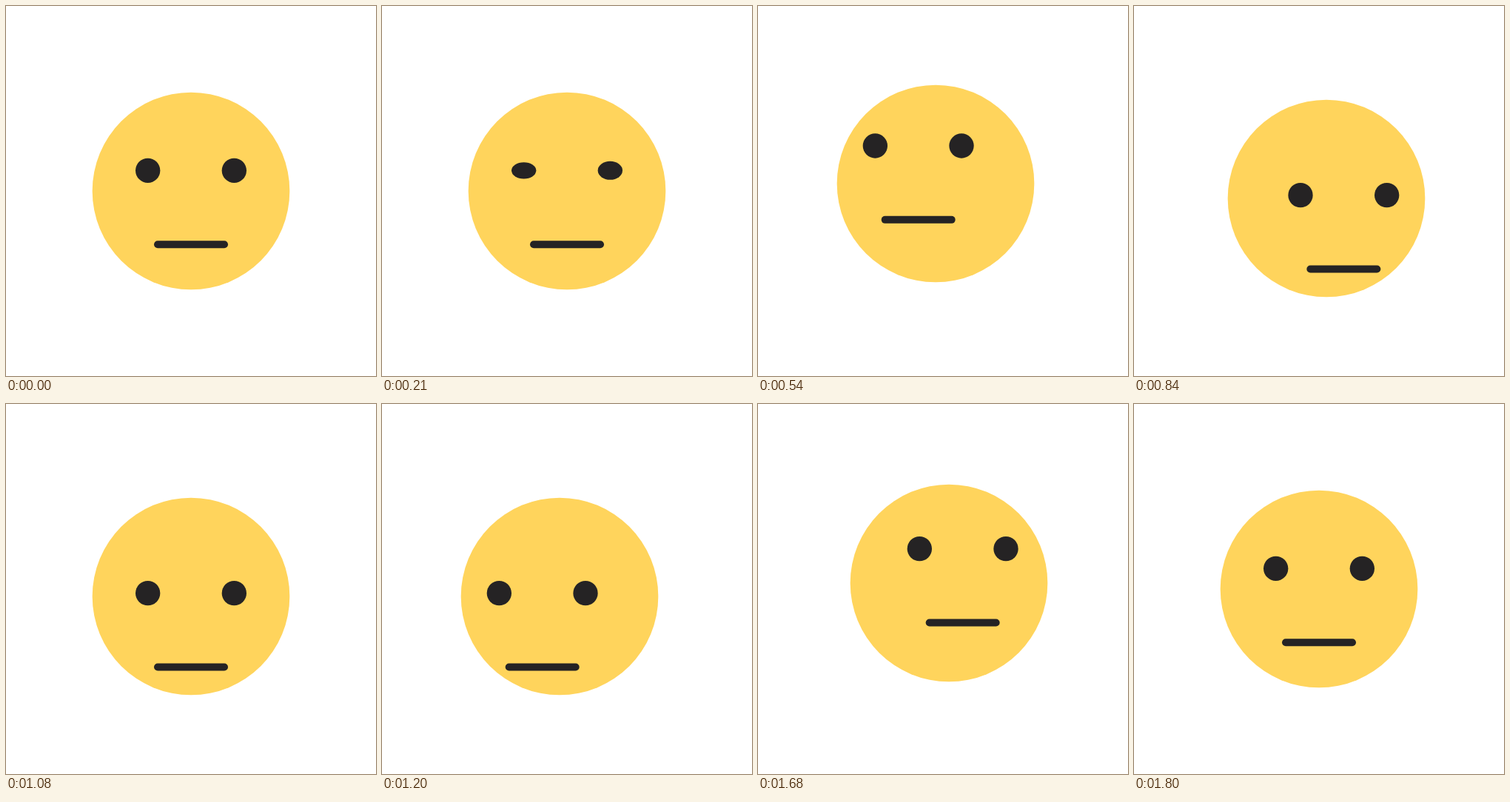
Animation of 500x500 px, one loop 2730 ms. Source, as an HTML page:

```html
<!DOCTYPE html>
<html lang="en">
<head>
<meta charset="utf-8">
<title>Looking around</title>
<style>
  html, body { margin: 0; height: 100%; overflow: hidden; background: #fff; }
  svg { display: block; width: 100%; height: 100%; }
</style>
</head>
<body>
<svg viewBox="0 0 500 500">
  <circle id="head" cx="250" cy="250" r="133.33" fill="#ffd45c"/>
  <g id="face" fill="#252324">
    <ellipse id="left" cx="191.67" cy="222.3" rx="16.67" ry="16.67"/>
    <ellipse id="right" cx="308.33" cy="222.3" rx="16.67" ry="16.67"/>
    <rect x="200" y="317.2" width="100" height="10" rx="5"/>
  </g>
</svg>
<script>
  const STEP = 30, STEPS = 91, EYE = 16.67, BLINK = 8;
  const HEAD_SHIFT = 10, FACE_SHIFT = 33.33;

  // Each glance heads for a corner (or back to the middle) between two steps.
  const glances = [
    { x: -1, y: -1, from: 8, to: 18 },
    { x: 1, y: 1, from: 22, to: 28 },
    { x: -1, y: 1, from: 32, to: 40 },
    { x: 1, y: -1, from: 44, to: 50 },
    { x: 0, y: 0, from: 55, to: 60 }
  ];

  const [head, face, left, right] =
    ["head", "face", "left", "right"].map(id => document.getElementById(id));

  const progress = (step, from, to) =>
    Math.min(1, Math.max(0, (step - from) / (to - from)));

  function gazeAt(step) {
    let x = 0, y = 0;
    for (const glance of glances) {
      const p = progress(step, glance.from, glance.to);
      x += (glance.x - x) * p;
      y += (glance.y - y) * p;
    }
    return [x, y];
  }

  function shift(part, [x, y], amount) {
    part.setAttribute("transform", `translate(${x * amount} ${y * amount})`);
  }

  function blink(eye, step, shut) {
    const open = 1 - progress(step, 0, shut) + progress(step, shut, BLINK);
    eye.setAttribute("ry", EYE * open);
  }

  function draw(step) {
    const gaze = gazeAt(step);
    shift(head, gaze, HEAD_SHIFT);
    shift(face, gaze, FACE_SHIFT);
    blink(left, step, 5);
    blink(right, step, 4);
  }

  const start = performance.now();
  function tick() {
    draw(Math.floor((performance.now() - start) / STEP) % STEPS);
    requestAnimationFrame(tick);
  }
  tick();
</script>
</body>
</html>
```
